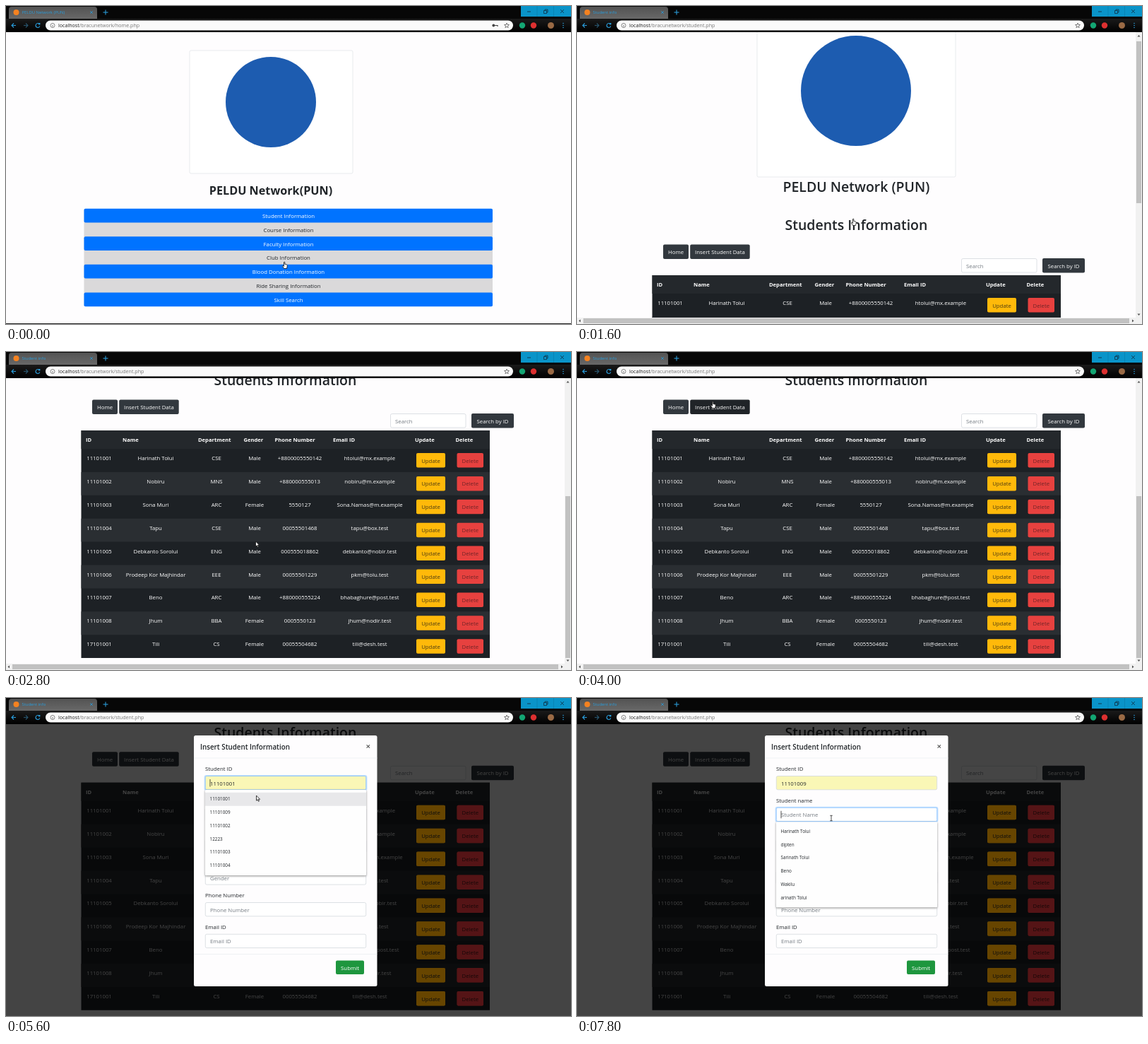
Write an HTML page with a canvas that moves like this. It is 800 px wide and 450 px high and loops after 8000 ms.

```html
<!DOCTYPE html>
<html lang="en">
<head>
<meta charset="utf-8">
<title>Student network demo</title>
<style>
  html, body { margin: 0; width: 100%; height: 100%; overflow: hidden; background: #fff; }
  canvas { display: block; width: 800px; height: 450px; }
</style>
</head>
<body>
<canvas id="stage" width="800" height="450"></canvas>
<script>
const ctx = document.getElementById('stage').getContext('2d');
const LOOP = 8000, STEP = 200;
const BODY = 7.8, HEADING = 19.5, PAGE_TOP = 37;
const BLUE = '#0073ff', LOGO = '#1d5cb0', DARK = '#32383e', INK = '#212529', SKY = '#2a9bd8';

const MENU = ['Student', 'Course', 'Faculty', 'Club', 'Blood Donation', 'Ride Sharing']
  .map(name => name + ' Information').concat('Skill Search');
const HEADERS = [['ID', 113], ['Name', 165], ['Department', 272], ['Gender', 336.5],
  ['Phone Number', 380.5], ['Email ID', 463], ['Update', 579], ['Delete', 636.5]];
const COLUMNS = [132, 212, 298, 352, 416, 515];
const STUDENTS = [
  '11101001|Harinath Tolui|CSE|Male|+8800005550142|htolui@mx.example',
  '11101002|Nobiru|MNS|Male|+880000555013|nobiru@m.example',
  '11101003|Sona Muri|ARC|Female|5550127|Sona.Namas@m.example',
  '11101004|Tapu|CSE|Male|00055501468|tapu@box.test',
  '11101005|Debkanto Sorolui|ENG|Male|000555018862|debkanto@nobir.test',
  '11101006|Prodeep Kor Majhindar|EEE|Male|00055501229|pkm@tolu.test',
  '11101007|Beno|ARC|Male|+880000555224|bhabaghure@post.test',
  '11101008|Jhum|BBA|Female|0005550123|jhum@nodir.test',
  '17101001|Tili|CS|Female|00055504682|tili@desh.test'
].map(row => row.split('|'));
const FIELDS = [['Student ID', 'Student ID'], ['Student name', 'Student Name'], ['Department', 'Department'],
  ['Gender', 'Gender'], ['Phone Number', 'Phone Number'], ['Email ID', 'Email ID']];
const ID_HINTS = ['11101001', '11101009', '11101002', '12223', '11101003', '11101004'];
const NAME_HINTS = ['Harinath Tolui', 'dipten', 'Sarinath Tolui', 'Beno', 'Wakilu', 'arinath Tolui'];

// Key times in ms
const OPEN_PAGE = 1000, OPEN_MODAL = 4200, FOCUS_ID = 5200, PICK_ID = 6400, FOCUS_NAME = 7400;
const SCROLL = [[1400, 0], [1600, 15], [1800, 130], [2000, 220], [2200, 272], [2400, 285]];
const POINTER = [[0, 395, 367], [200, 395, 362], [800, 392, 306], [1600, 392, 306], [2400, 372, 285],
  [2800, 355, 272], [3400, 345, 262], [3800, 215, 95], [4000, 193, 75], [4200, 194, 76], [4400, 254, 94],
  [5000, 345, 121], [5200, 348, 122], [5600, 356, 142], [6000, 356, 161], [6400, 357, 162],
  [7000, 360, 168], [7800, 360, 170]];

// Piecewise linear value of a keyed track
function at(keys, t, part = 1) {
  const next = keys.findIndex(k => k[0] > t);
  if (next === 0) return keys[0][part];
  if (next < 0) return keys[keys.length - 1][part];
  const a = keys[next - 1], b = keys[next];
  return a[part] + (b[part] - a[part]) * (t - a[0]) / (b[0] - a[0]);
}

function box(x, y, w, h, fill, radius = 0, stroke) {
  ctx.beginPath();
  ctx.roundRect(x, y, w, h, radius);
  if (fill) { ctx.fillStyle = fill; ctx.fill(); }
  if (stroke) { ctx.strokeStyle = stroke; ctx.lineWidth = 0.7; ctx.stroke(); }
}

function disc(x, y, r, fill) {
  ctx.beginPath();
  ctx.arc(x, y, r, 0, 7);
  ctx.fillStyle = fill;
  ctx.fill();
}

// y is the middle of the capitals
function text(str, x, y, { size = BODY, color = INK, align = 'left', weight = 500 } = {}) {
  ctx.font = `${weight} ${size}px "Open Sans", "Noto Sans", sans-serif`;
  ctx.textAlign = align;
  ctx.fillStyle = color;
  ctx.fillText(str, x, y + size * 0.36);
}

function line(color, width, ...points) {
  ctx.beginPath();
  points.forEach(([x, y]) => ctx.lineTo(x, y));
  ctx.strokeStyle = color;
  ctx.lineWidth = width;
  ctx.stroke();
}

function cross(x, y, r, color, width = 1) {
  line(color, width, [x - r, y - r], [x + r, y + r]);
  line(color, width, [x - r, y + r], [x + r, y - r]);
}

function button(label, x, y, w, h, fill, color = '#fff') {
  box(x, y, w, h, fill, 2);
  text(label, x + w / 2, y + h / 2 + 0.5, { color, align: 'center' });
}

function fade(top, bottom, from, to) {
  const gradient = ctx.createLinearGradient(0, top, 0, bottom);
  gradient.addColorStop(0, from);
  gradient.addColorStop(1, to);
  return gradient;
}

function browser(home) {
  box(0, 0, 800, 18, '#070707');
  box(4, 1, 125, 17, fade(0, 18, '#525252', '#686868'), [4, 4, 0, 0]);
  box(0, 18, 800, PAGE_TOP - 18, fade(18, PAGE_TOP, '#1a1a1a', '#000'));
  disc(14.5, 9, 4, '#f58220');
  text(home ? 'PELDU Network (PUN)' : 'Student info', 22.5, 9.3, { size: 5.9, color: SKY });
  cross(121, 9, 1.8, SKY, 0.8);
  line(SKY, 1.1, [137.5, 9], [144.5, 9]);
  line(SKY, 1.1, [141, 5.5], [141, 12.5]);

  box(729, 0, 71, 15, '#0a94c9');
  line('#123', 0.8, [738, 8], [743, 8]);
  box(761.5, 6.5, 4, 4, null, 0, '#123');
  line('#123', 0.7, [763, 6], [763, 5], [767, 5], [767, 9], [766, 9]);
  cross(787.5, 7.5, 2.3, '#123', 0.8);
  line('#087aa8', 0.6, [752, 0], [752, 15]);
  line('#087aa8', 0.6, [775.5, 0], [775.5, 15]);

  for (const [x, d, color] of [[11, 1, SKY], [28, -1, '#28546c']]) {
    line(color, 1.1, [x - 3 * d, 27.5], [x + 3 * d, 27.5]);
    line(color, 1.1, [x, 24.5], [x - 3 * d, 27.5], [x, 30.5]);
  }
  ctx.beginPath();
  ctx.arc(45, 27.5, 2.9, 0.3, 5.5);
  ctx.strokeStyle = SKY;
  ctx.lineWidth = 1.1;
  ctx.stroke();
  box(46, 24, 2.4, 2.4, SKY);

  box(56, 20.5, 662, 14, '#fafafa', 7);
  ctx.beginPath();
  ctx.arc(66, 27.5, 3, 0, 7);
  ctx.strokeStyle = '#555';
  ctx.lineWidth = 0.7;
  ctx.stroke();
  line('#555', 0.8, [66, 27], [66, 29.3]);
  text('localhost', 74, 27.8, { size: 7.1, color: '#222' });
  const hostWidth = ctx.measureText('localhost').width;
  text('/bracunetwork/' + (home ? 'home' : 'student') + '.php', 74 + hostWidth, 27.8, { size: 7.1, color: '#777' });
  if (home) {
    disc(690.3, 27.5, 1.9, '#444');
    line('#444', 1.2, [691, 27.5], [696, 27.5], [696, 29]);
  }
  ctx.beginPath();
  for (let i = 0; i < 10; i++) {
    const r = i % 2 ? 1.6 : 3.6, a = i * Math.PI / 5 - Math.PI / 2;
    ctx.lineTo(709 + r * Math.cos(a), 27.7 + r * Math.sin(a));
  }
  ctx.closePath();
  ctx.strokeStyle = '#444';
  ctx.lineWidth = 0.7;
  ctx.stroke();
  disc(731, 27.5, 4.2, '#13a673');
  disc(747, 27.5, 4.2, '#dd3030');
  disc(771.5, 27.5, 4.5, '#9a6a45');
  for (let i = -1; i < 2; i++) disc(789, 27.5 + i * 3, 0.8, SKY);
}

function homePage(hovered) {
  box(260, 63, 231, 174, '#fff', 2, '#dee2e6');
  disc(375, 136, 64, LOGO);
  text('PELDU Network(PUN)', 375, 261, { size: 16.2, weight: 700, align: 'center' });
  box(110.5, 287, 578.5, 138, '#dad9da', 2);
  MENU.forEach((label, i) => {
    const y = 286.7 + i * 19.78, blue = i % 2 === 0;
    if (blue) box(110.5, y, 578.5, 19.8, hovered && i === 0 ? '#0069d9' : BLUE, 2);
    text(label, 400, y + 10.5, { color: blue ? '#fff' : INK, align: 'center' });
  });
  line('#222', 1, [0, 449.5], [800, 449.5]);
}

function rowButtons(top, dimmed) {
  STUDENTS.forEach((_, i) => {
    const y = top + 6 + i * 32.9;
    button('Update', 581, y, 41, 20.5, dimmed ? '#674500' : '#ffb90a', dimmed ? '#0d0d0d' : '#4a3b12');
    button('Delete', 638.5, y, 37.5, 20.5, dimmed ? '#551416' : '#e7413f', dimmed ? '#160808' : '#712427');
  });
}

// offset: vertical position of the page's top relative to its unscrolled place
function studentPage(offset, hovered, focused) {
  const center = { align: 'center', size: HEADING, weight: 600 };
  box(255, 45 + offset, 281, 212, '#fff', 2, '#dee2e6');
  disc(395, 135 + offset, 78, LOGO);
  text('PELDU Network (PUN)', 395.5, 271 + offset, center);
  text('Students Information', 395.5, 325 + offset, center);
  const y = 352.5 + offset;
  button('Home', 122, y, 36, 20.5, DARK);
  if (focused) box(159.3, y - 1, 86.4, 22.5, '#8b8d90', 3);
  button('Insert Student Data', 160.2, y, 84.5, 20.5, hovered ? '#202428' : DARK);
  box(544.5, y + 20, 106.5, 19.5, '#fff', 2, '#ced4da');
  text('Search', 551, y + 30.3, { color: '#747b82' });
  button('Search by ID', 659, y + 19.5, 60, 20.5, DARK);

  const top = 396 + offset;
  box(106.5, top, 578.5, 322, '#1d2125');
  box(106.5, top, 578.5, 26, '#24282c');
  HEADERS.forEach(([label, x]) => text(label, x, top + 13.3, { color: '#fff', weight: 700, size: 7.6 }));
  STUDENTS.forEach((row, i) => {
    const rowTop = top + 26 + i * 32.9;
    if (i % 2) box(106.5, rowTop, 578.5, 32.9, '#2a2e32');
    row.forEach((cell, c) => text(cell, COLUMNS[c], rowTop + 13.2, { color: '#fff', align: 'center' }));
  });
  rowButtons(top + 26, false);
}

function scrollbars(scroll) {
  box(791, PAGE_TOP, 9, 450 - PAGE_TOP, '#f1f1f1');
  box(0, 441, 791, 9, '#f1f1f1');
  box(792, 204 - (285 - scroll) * 0.57, 7, 229, '#c1c1c1');
  box(9, 442, 773, 7, '#c1c1c1');
  for (const [x, y, dx, dy] of [[795.5, 42.5, 0, -1], [795.5, 436.5, 0, 1], [4, 445.5, -1, 0], [787, 445.5, 1, 0]]) {
    ctx.beginPath();
    ctx.moveTo(x + dx * 1.5, y + dy * 1.5);
    ctx.lineTo(x - dx + dy * 2, y - dy + dx * 2);
    ctx.lineTo(x - dx - dy * 2, y - dy - dx * 2);
    ctx.fillStyle = '#505050';
    ctx.fill();
  }
}

function modal(dy, focus, id) {
  ctx.save();
  ctx.translate(0, dy);
  box(266, 53, 259.5, 355, '#fefdfe', 2.5);
  text('Insert Student Information', 275, 69.3, { size: 9.8, weight: 600 });
  cross(512.8, 68.5, 2.2, '#555', 1.1);
  line('#e9ecef', 0.7, [266, 85], [525.5, 85]);
  line('#e9ecef', 0.7, [266, 362.5], [525.5, 362.5]);
  FIELDS.forEach(([label, hint], i) => {
    const y = 100.5 + i * 44.75, value = i === 0 ? id : '', active = i === focus;
    text(label, 282, y);
    if (active) box(280.6, y + 8.4, 230.8, 22.4, '#bfdeff', 3);
    box(282.3, y + 10, 227.4, 19.3, value ? '#faf7b6' : '#fff', 2, active ? '#80bdff' : '#ced4da');
    text(value || hint, 289, y + 20.3, { color: value ? INK : '#747b82' });
    if (active) line('#000', 0.7, [289, y + 14.5], [289, y + 25]);
  });
  button('Submit', 467, 371.5, 40, 19.5, '#1e963e');
  ctx.restore();
}

function hints(items, top, selected) {
  ctx.save();
  ctx.shadowColor = 'rgba(0,0,0,.45)';
  ctx.shadowBlur = 3;
  ctx.shadowOffsetY = 1;
  box(282, top, 228, 121, '#fefefe', 1);
  ctx.restore();
  items.forEach((item, i) => {
    const y = top + 13.2 + i * 18.75;
    if (i === selected) box(282, y - 9.5, 228, 19, '#e8e8ea');
    text(item, 288.5, y, { size: 6.35 });
  });
}

const SHAPES = {
  arrow: new Path2D('M-1.5 -4V3.2L.2 1.7L1.4 4.3L2.5 3.8L1.4 1.3H3.6Z'),
  hand: new Path2D('M-1.5 -4.5Q-.8 -5.3 -.1 -4.5V-1.6L2.6 -.9Q3.4 -.6 3.3 .4L2.6 4.5H-1.4L-3.6 1Q-3.3 0 -2.4 .5L-1.5 1.4Z')
};

function pointer(kind, x, y) {
  ctx.save();
  ctx.translate(x, y);
  if (kind === 'beam') {
    line('#222', 0.8, [0, -3.5], [0, 3.5]);
    line('#222', 0.8, [-1.7, -3.7], [1.7, -3.7]);
    line('#222', 0.8, [-1.7, 3.7], [1.7, 3.7]);
  } else {
    ctx.fillStyle = '#fff';
    ctx.strokeStyle = '#111';
    ctx.lineWidth = 0.8;
    ctx.fill(SHAPES[kind]);
    ctx.stroke(SHAPES[kind]);
  }
  ctx.restore();
}

function pointerKind(t) {
  if (t < 1800 || (t >= 4000 && t < 4400)) return 'hand';
  if ((t >= 5000 && t < 5400) || t >= 6800) return 'beam';
  return 'arrow';
}

function draw(t) {
  box(0, 0, 800, 450, '#fefdfe');
  const home = t < OPEN_PAGE, open = t >= OPEN_MODAL;
  if (home) {
    homePage(t >= 800);
  } else {
    const scroll = at(SCROLL, t), offset = -scroll + (open ? 8.8 : 0);
    studentPage(offset, t >= 4000 && t < 4400, open && t < FOCUS_ID);
    if (!open) {
      scrollbars(scroll);
    } else {
      const ready = t > OPEN_MODAL;
      box(0, PAGE_TOP, 800, 450 - PAGE_TOP, `rgba(0,0,0,${ready ? 0.73 : 0.4})`);
      if (ready) {
        rowButtons(422 + offset, true);
        const picking = t >= FOCUS_ID && t < PICK_ID;
        const selected = t < 5600 ? -1 : t < 6000 ? 0 : 1;
        const focus = t >= FOCUS_NAME ? 1 : t >= FOCUS_ID ? 0 : -1;
        modal(t < 4600 ? -22.5 : 0, focus, ID_HINTS[selected] || '');
        if (picking) hints(ID_HINTS, 130, selected);
        if (t >= FOCUS_NAME) hints(NAME_HINTS, 175.3, -1);
      }
    }
  }
  browser(home);
  pointer(pointerKind(t), at(POINTER, t), at(POINTER, t, 2));
}

function tick() {
  draw(Math.floor(performance.now() % LOOP / STEP) * STEP);
  requestAnimationFrame(tick);
}
tick();
</script>
</body>
</html>
```
